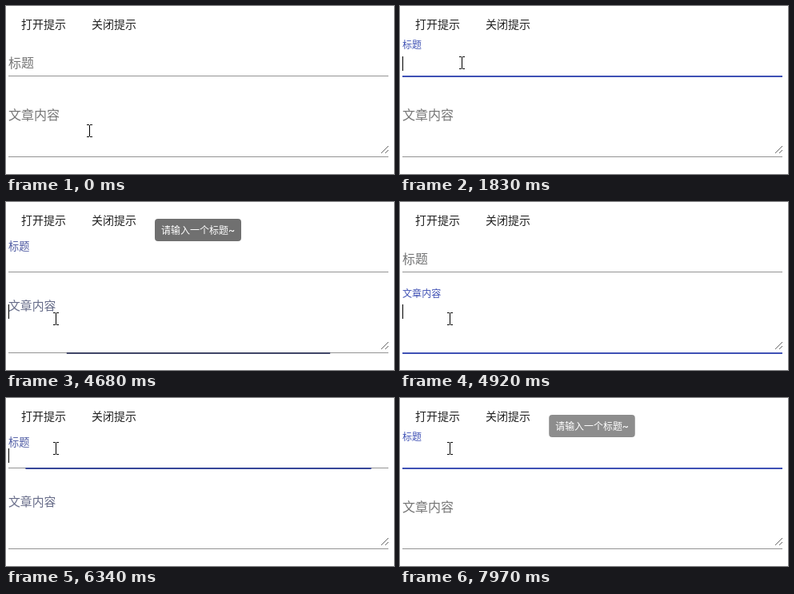
Write an HTML page with a canvas that moves like this. It is 485 px wide and 210 px high and loops after 7.99 s.

```html
<!DOCTYPE html>
<html lang="zh-CN">
<head>
<meta charset="utf-8">
<title>表单提示</title>
<style>
html, body { margin: 0; width: 100%; height: 100%; overflow: hidden; background: #fff; }
body { position: relative; font-family: Roboto, "Noto Sans CJK SC", "Noto Sans CJK", sans-serif; }
canvas { position: absolute; left: 0; top: 0; width: 485px; height: 210px; }
span { position: absolute; white-space: nowrap; line-height: 16px; }
.button { top: 15px; font-size: 14px; color: rgba(0,0,0,.87); }
.label { left: 3px; font-size: 16px; transform-origin: 0 50%; }
#tip {
  left: 186px; top: 21px; width: 108px; height: 27px; padding-top: 1px;
  border-radius: 4px; background: rgb(97,97,97); color: #fff;
  font-size: 12px; font-weight: 500; line-height: 28px; text-align: center;
}
</style>
</head>
<body>
<span class="button" style="left:19px">打开提示</span>
<span class="button" style="left:107px">关闭提示</span>
<span class="label" id="title" style="top:64px">标题</span>
<span class="label" id="content" style="top:129px">文章内容</span>
<span id="tip">请输入一个标题~</span>
<canvas id="stage" width="485" height="210"></canvas>
<script>
const LOOP = 7990, BLINK = 540;
const FOCUS = { title1: 1505, content: 4645, title2: 6242 };
const $ = id => document.getElementById(id);
const ctx = $('stage').getContext('2d');
const clamp = v => Math.min(1, Math.max(0, v));
const mix = (a, b, p) => a + (b - a) * p;

function bezier(x1, y1, x2, y2) {
  const at = (a, b, s) => 3 * a * s * (1 - s) ** 2 + 3 * b * s * s * (1 - s) + s ** 3;
  return x => {
    if (x <= 0) return 0;
    if (x >= 1) return 1;
    let lo = 0, hi = 1;
    for (let i = 0; i < 24; i++) {
      const s = (lo + hi) / 2;
      if (at(x1, x2, s) < x) lo = s; else hi = s;
    }
    return at(y1, y2, lo);
  };
}
const swift = bezier(.25, .8, .25, 1);
const decel = bezier(0, 0, .2, 1);

// start, end, from x/y, to x/y, sideways bulge
const MOVES = [
  [415, 990, 104, 148, 78, 68, 0],
  [1130, 1190, 78, 68, 77, 63, 0],
  [3640, 4600, 77, 63, 62, 138, 11],
  [5130, 5970, 62, 138, 62, 55, 12]
];

function pointer(t) {
  const m = MOVES.filter(v => t >= v[0]).pop() || MOVES[0];
  const u = clamp((t - m[0]) / (m[1] - m[0]));
  const p = u * u * (3 - 2 * u);
  return [
    Math.round(mix(m[2], m[4], p) + m[6] * 4 * p * (1 - p)),
    Math.round(mix(m[3], m[5], p))
  ];
}

function rect(x, y, w, h, color) {
  ctx.fillStyle = color;
  ctx.fillRect(x, y, w, h);
}

function drawPointer([x, y]) {
  rect(x - 3, y, 3, 1, '#000');
  rect(x + 1, y, 3, 1, '#000');
  rect(x, y + 1, 1, 14, '#000');
  rect(x - 3, y + 15, 3, 1, '#000');
  rect(x + 1, y + 15, 3, 1, '#000');
}

function drawUnderline(y, age) {
  rect(3, y, 475, 1, '#949494');
  if (age < 0) return;
  const p = swift(age / 300), w = 475 * mix(.5, 1, p);
  const a = mix(.87, 1, p);
  const [r, g, b] = [63, 81, 181].map(c => Math.round(c * p / a));
  ctx.globalAlpha = swift(age / 100);
  rect(240.5 - w / 2, y, w, 2, `rgba(${r},${g},${b},${a})`);
  ctx.globalAlpha = 1;
}

function drawCaret(y, age) {
  if (Math.floor(Math.max(0, age) / BLINK) % 2 === 0) rect(3, y, 1, 18, '#000');
}

function drawGrip() {
  ctx.strokeStyle = '#666';
  ctx.lineWidth = 1;
  ctx.beginPath();
  ctx.moveTo(469, 184); ctx.lineTo(478, 175);
  ctx.moveTo(474, 184); ctx.lineTo(478, 180);
  ctx.stroke();
}

function setLabel(el, p) {
  const a = mix(.54, 1, p);
  const rgb = [63, 81, 181].map(c => Math.round(c * p / a));
  el.style.transform = `translateY(${-22.5 * p}px) scale(${1 - .25 * p})`;
  el.style.color = `rgba(${rgb},${a})`;
}

function setTip(t) {
  const age = t - (t < 6000 ? 3067 : 7845);
  const first = decel(age / 100), second = decel((age - 100) / 100);
  const out = t < 6000 ? decel((t - 4690) / 100) : 0;
  $('tip').style.opacity = .9 * (first + second) / 2 * (1 - out);
  $('tip').style.transform = `scale(${.99 * first + .01 * second})`;
}

function render(t) {
  const lift = start => swift((t - start) / 400);
  const { title1, content, title2 } = FOCUS;
  setLabel($('title'), lift(title1) - lift(content) + lift(title2));
  setLabel($('content'), lift(content) - lift(title2));
  setTip(t);

  ctx.clearRect(0, 0, 485, 210);
  const inContent = t >= content && t < title2;
  drawUnderline(87, inContent ? -1 : t - (t < content ? title1 : title2));
  drawUnderline(188, inContent ? t - content : -1);
  drawGrip();
  if (inContent) drawCaret(128, t - content);
  else if (t >= title2) drawCaret(63, t - 6250);
  else if (t >= title1) drawCaret(63, t - 1550);
  drawPointer(pointer(t));
}

const begin = performance.now();
function tick() {
  render((performance.now() - begin) % LOOP);
  requestAnimationFrame(tick);
}
tick();
</script>
</body>
</html>
```
